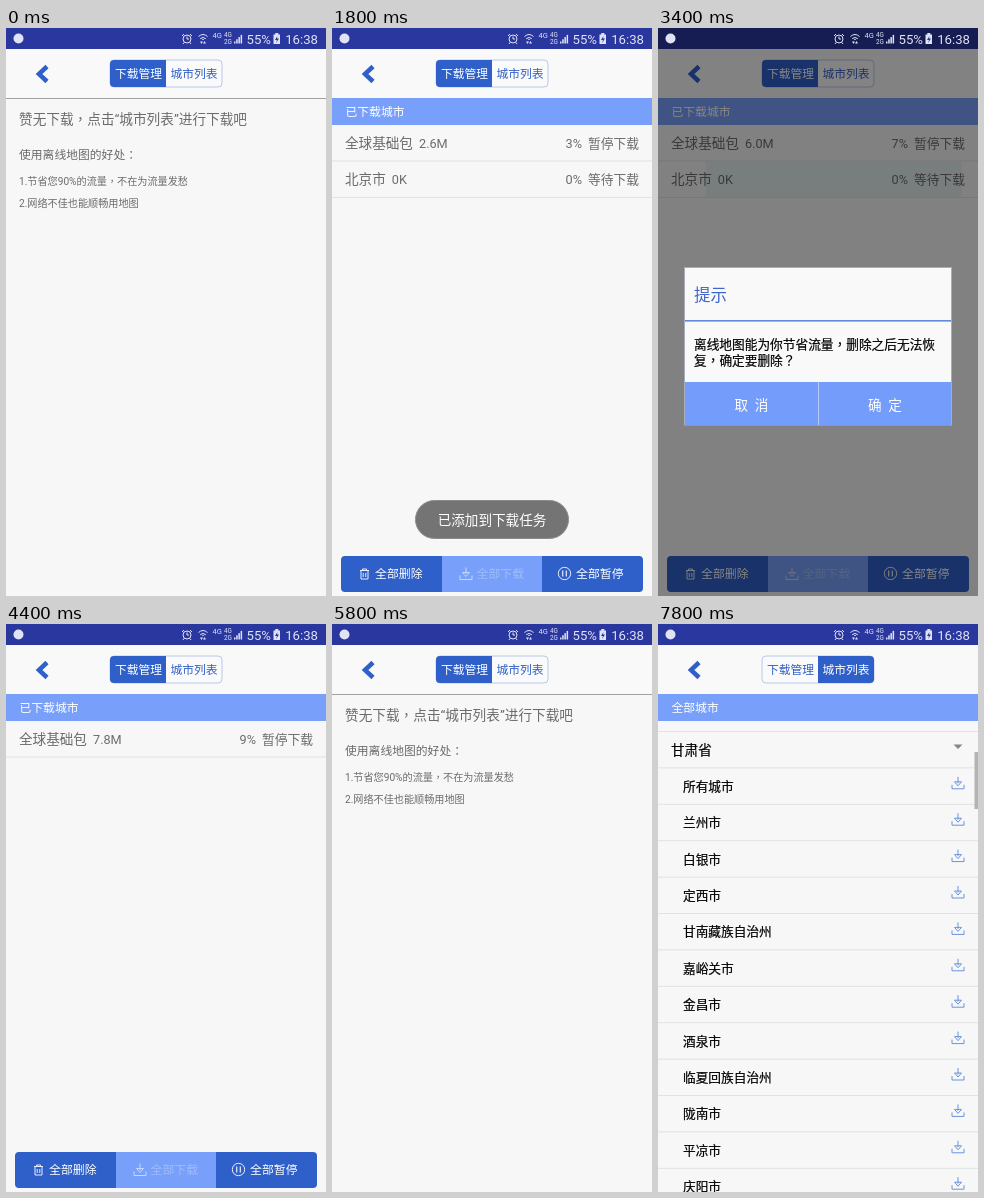
Write an HTML page that moves like this. It is 320 px wide and 568 px high and loops after 8000 ms.

```html
<!DOCTYPE html>
<html lang="zh-CN">
<head>
<meta charset="utf-8">
<style>
html, body { margin: 0; height: 100%; overflow: hidden; background: #f7f7f7; }
svg { display: block; width: 320px; height: 568px; }
text { font-family: Roboto, "Noto Sans CJK SC", "Noto Sans CJK", sans-serif; white-space: pre; }
.mark { font-family: "Noto Sans CJK TC", "Noto Sans CJK", sans-serif; }
.strong { stroke: #000; stroke-width: 0.2px; }
</style>
</head>
<body>
<svg id="stage" viewBox="0 0 320 568"></svg>
<script>
const LOOP = 8000, STEP = 200, ROW = 36.4, LIST_TOP = 97;
const BLUE = '#2f5fc8', LIGHT = '#78a0fa', PAGE = '#f7f7f7', GREY = '#6b6b6b', INK = '#000';

const rect = (x, y, w, h, fill, extra = '') =>
  `<rect x="${x}" y="${y}" width="${w}" height="${h}" fill="${fill}" ${extra}/>`;
const line = (d, stroke, width = 1) =>
  `<path d="${d}" fill="none" stroke="${stroke}" stroke-width="${width}"/>`;
const shape = (d, fill) => `<path d="${d}" fill="${fill}"/>`;
// Text is placed by the vertical middle of its line; zh-Hant centres full-width punctuation.
const text = (x, mid, string, size, fill, anchor = 'start') =>
  `<text x="${x}" y="${mid + size * 0.37}" font-size="${size}" fill="${fill}" text-anchor="${anchor}"` +
  ` class="${fill === INK ? 'strong' : ''}">` +
  string.replace(/[，：？]/g, '<tspan class="mark" lang="zh-Hant">$&</tspan>') + '</text>';
const divider = (y, color = '#dfe3e3') => rect(0, y - 0.5, 320, 1, color);
const at = (x, y, content) => `<g transform="translate(${x} ${y})">${content}</g>`;
const within = (t, from, to) => t >= from && t < to;

const downloadIcon = (x, y, color) => at(x, y,
  line('M0-6.5V0M-3.5-1.5H3.5L0 2.5ZM-6 1.5V5.5H6V1.5', color));

function statusIcons() {
  const white = '#e0e3f6';
  let out = `<circle cx="12.5" cy="10.5" r="5" fill="${white}"/>`;
  out += at(181, 11, `<circle r="4" fill="none" stroke="${white}"/>` +
    line('M0-2.5V0H2M-5-3L-3-5M5-3L3-5M-3 3.5L-4 5M3 3.5L4 5', white));
  out += at(197, 11, line('M-4.5-2.5Q0-6.5 4.5-2.5M-2.8-.3Q0-2.8 2.8-.3', white) +
    shape('M-1.2 1L0-.3 1.2 1ZM-3 2.5H0L-1.5 5ZM0 4.5H3L1.5 2Z', white));
  out += text(206.5, 7.5, '4G', 7.5, white) + text(218, 7, '4G', 6.4, white) +
    text(218, 13.5, '2G', 6.4, white);
  for (let i = 0; i < 4; i++) {
    const height = 2 + i * 2.2;
    out += rect(228 + i * 2.2, 15.5 - height, 1.5, height, white);
  }
  out += text(240.5, 11, '55%', 13.2, white);
  out += rect(267.5, 6.5, 6.5, 9.5, white) + rect(269.3, 5, 3, 2, white) +
    shape('M271.5 8L269 12H271L270 15 273 10.5H271Z', '#26358f');
  return out + text(312, 11, '16:38', 13.2, white, 'end');
}

function header(cityTab) {
  const left = 'M160 32H108Q104 32 104 36V55Q104 59 108 59H160Z';
  const right = 'M160 32H212Q216 32 216 36V55Q216 59 212 59H160Z';
  return rect(0, 0, 320, 70, '#f9f9f9') + rect(0, 0, 320, 21, '#2a379f') +
    line('M41 38.5L33 46 41 53.5', BLUE, 4.5) +
    rect(104, 32, 112, 27, '#fafafa', 'rx="4" stroke="#b8c8ea"') +
    shape(cityTab ? right : left, BLUE) +
    text(132.5, 46, '下载管理', 11.8, cityTab ? BLUE : '#fff', 'middle') +
    text(188, 46, '城市列表', 11.8, cityTab ? '#fff' : BLUE, 'middle');
}

const titleBar = title => rect(0, 70, 320, 27, LIGHT) + text(13.5, 84, title, 11.8, '#fff');

function emptyPage() {
  return header(false) + divider(70.5, '#a2a2a2') +
    text(13, 91, '赞无下载，点击“城市列表”进行下载吧', 13.65, GREY) +
    text(13, 126.5, '使用离线地图的好处：', 11.8, GREY) +
    text(13, 153, '1.节省您90%的流量，不在为流量发愁', 10.15, GREY) +
    text(13, 175.5, '2.网络不佳也能顺畅用地图', 10.15, GREY);
}

function taskRow(index, name, size, percent, status) {
  const mid = 115 + index * ROW;
  return text(13, mid, name, 13.6, GREY) +
    text(name.length * 13.6 + 19, mid, size, 12.7, GREY) +
    text(250, mid, percent + '%', 12.7, GREY, 'end') +
    text(256, mid, status, 12.75, GREY) + divider(mid + 18, '#e2e2e2');
}

function actionBar() {
  const trash = at(32.5, 546, line('M-4.5-3.5H4.5M-2-3.5V-5H2V-3.5M-3.5-3.5V5H3.5V-3.5M-1.3-1V3M1.3-1V3', '#e6edfc'));
  const pause = at(232.5, 545.5, '<circle r="6.2" fill="none" stroke="#e6edfc"/>' + line('M-1.8-3V3M1.8-3V3', '#e6edfc', 1.2));
  return rect(9, 528, 302, 36, BLUE, 'rx="4"') + rect(110, 528, 100, 36, LIGHT) +
    trash + downloadIcon(134, 546, '#c5d7fc') + pause +
    text(43, 546, '全部删除', 11.9, '#fff') +
    text(144.5, 546, '全部下载', 11.9, '#9fbcfb') +
    text(244, 546, '全部暂停', 11.9, '#fff');
}

function downloadPage(t) {
  const megabytes = t < 3400 ? 2.6 + (t - 1800) * 3.4 / 1600 : 6 + (t - 3400) * 0.0018;
  const percent = Math.floor(megabytes / 0.85);
  let out = header(false) + titleBar('已下载城市');
  if (within(t, 3000, 3600)) out += rect(48, 133.5, 256, 35, '#e6f0ef');
  out += taskRow(0, '全球基础包', megabytes.toFixed(1) + 'M', percent, '暂停下载');
  if (t < 4200) out += taskRow(1, '北京市', '0K', 0, '等待下载');
  return out + actionBar();
}

const regions = '全球基础包 北京市 上海市 天津市 重庆市 安徽省 福建省 甘肃省 广东省 广西壮族自治区 贵州省 海南省 河北省'.split(' ');
const gansu = '所有城市 兰州市 白银市 定西市 甘南藏族自治州 嘉峪关市 金昌市 酒泉市 临夏回族自治州 陇南市 平凉市 庆阳市 天水市 武威市 张掖市'.split(' ');

function cityPage(t) {
  const progress = Math.min(1, Math.max(0, (t - 6800) / 800));
  const scroll = 244.3 * (1 - (1 - progress) ** 2);
  const rows = regions.flatMap(name => {
    const group = [{ name, x: 13, size: 13.6, province: /[省区]$/.test(name) }];
    if (name === '甘肃省' && t >= 6800)
      group.push(...gansu.map(city => ({ name: city, x: 25, size: 12.7 })));
    return group;
  });
  let out = '';
  rows.forEach((row, i) => {
    const top = LIST_TOP + i * ROW - scroll;
    if (top < 60 || top > 568) return;
    out += text(row.x, top + 18.2, row.name, row.size, INK) + divider(top + ROW);
    out += row.province
      ? at(300, top + 15, shape('M-4.5-2H4.5L0 2.5Z', '#858585'))
      : downloadIcon(300, top + 15.4, '#6a93df');
  });
  if (progress > 0) out += rect(316.5, LIST_TOP + scroll * 0.127, 3.5, 57, '#b4b4b4');
  return out + header(true) + titleBar('全部城市');
}

function toast() {
  return rect(83.5, 472.5, 153, 38, '#747474', 'rx="19" stroke="#8b8b8b"') +
    text(160, 492, '已添加到下载任务', 13.6, '#fff', 'middle');
}

function dialog() {
  return rect(26.5, 239.5, 267, 157.5, '#f9f9f9', 'stroke="#a9adb8"') +
    text(36, 267, '提示', 16.5, '#3f66cb') + rect(27, 292, 266, 1.6, '#6389dc') +
    text(36, 316, '离线地图能为你节省流量，删除之后无法恢', 12.7, INK) +
    text(36, 332, '复，确定要删除？', 12.7, INK) +
    rect(27, 354, 266, 43, '#749cfa') + rect(160, 354, 1, 43, '#b7cbf8') +
    text(93.5, 376.5, '取\u00a0\u00a0消', 13.6, '#fff', 'middle') +
    text(227, 376.5, '确\u00a0\u00a0定', 13.6, '#fff', 'middle');
}

function scene(t) {
  let out = rect(0, 0, 320, 568, PAGE);
  if (within(t, 200, 1400) || t >= 6200) out += cityPage(t);
  else if (within(t, 1400, 5400)) out += downloadPage(t);
  else out += emptyPage();

  const opened = within(t, 3400, 4200) ? 3400 : within(t, 5000, 5600) ? 5000 : null;
  if (opened !== null)
    out += rect(0, 0, 320, 568, '#000', `opacity="${t === opened ? 0.48 : 0.6}"`) + dialog();
  if (within(t, 1000, 2600)) out += toast();
  return out + statusIcons();
}

const stage = document.getElementById('stage');
let shown = -1;
function tick() {
  const t = Math.floor(performance.now() % LOOP / STEP) * STEP;
  if (t !== shown) stage.innerHTML = scene(shown = t);
  requestAnimationFrame(tick);
}
tick();
</script>
</body>
</html>
```
